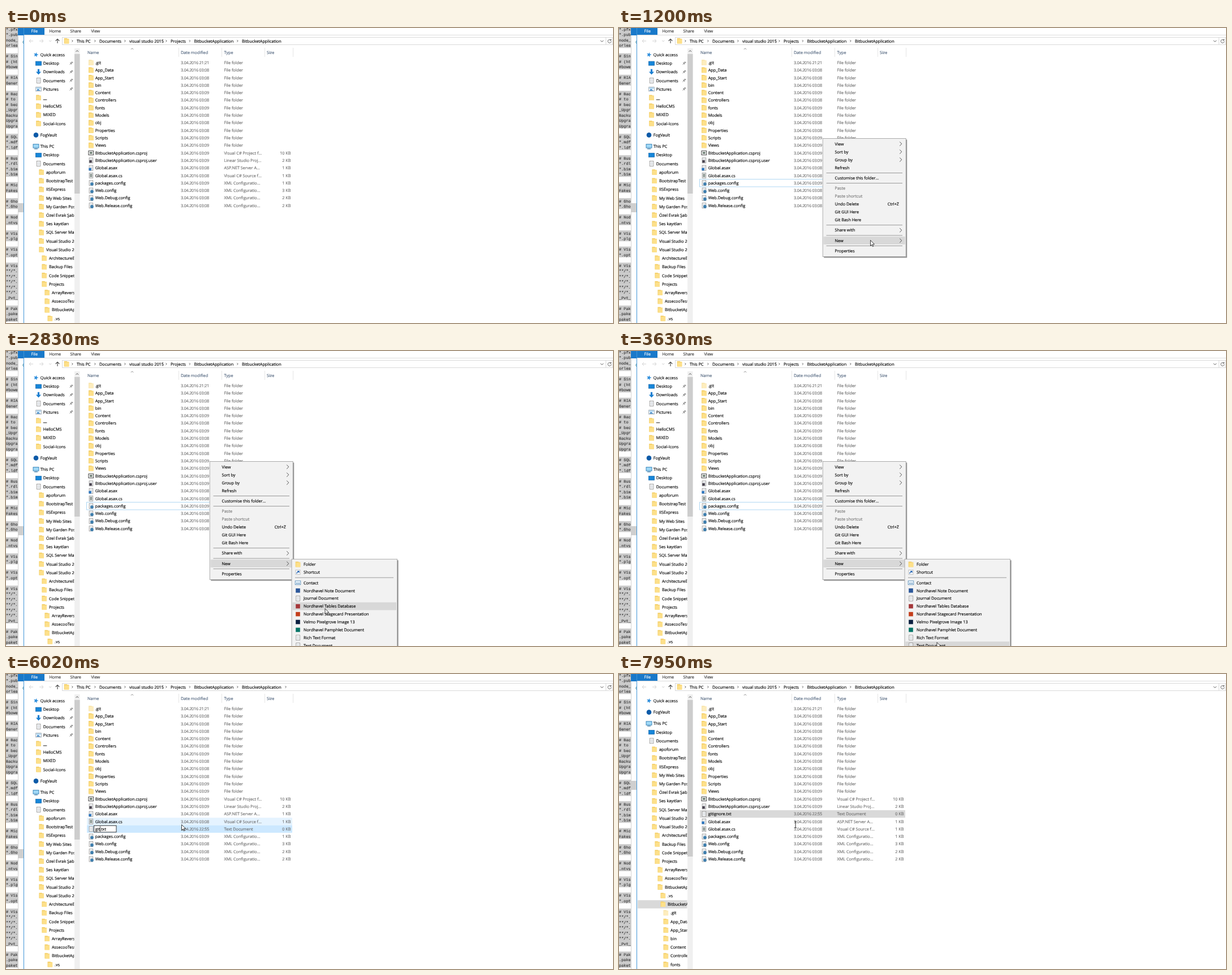
Write an HTML page that moves like this. It is 1073 px wide and 522 px high and loops after 8000 ms.

```html
<!DOCTYPE html>
<html lang="en">
<head>
<meta charset="utf-8">
<title>New text file</title>
<style>
html, body { margin: 0; width: 100%; height: 100%; overflow: hidden; background: #fff; }
svg { display: block; width: 100vw; height: 100vh; }
text { font: 7.27px "Open Sans", "Noto Sans", sans-serif; text-rendering: geometricPrecision; white-space: pre; stroke-width: .14px; }
.mono { font: 6.9px "Liberation Mono", "DejaVu Sans Mono", monospace; }
.digits { letter-spacing: -.23px; }
</style>
</head>
<body>
<svg id="stage" viewBox="0 0 1073 522" xmlns="http://www.w3.org/2000/svg">
<defs><clipPath id="nav"><rect x="33" y="36" width="87.5" height="486"/></clipPath>
<clipPath id="strip"><rect width="21" height="522"/></clipPath></defs>
</svg>
<script>
const stage = document.getElementById('stage');
const LOOP = 8000, INK = '#000', DIM = '#6d6d6d';

function add(parent, tag, attrs) {
  const node = document.createElementNS('http://www.w3.org/2000/svg', tag);
  for (const key in attrs) node.setAttribute(key, attrs[key]);
  return parent.appendChild(node);
}
const group = (parent, attrs = {}) => add(parent, 'g', attrs);
const rect = (parent, x, y, width, height, fill, more = {}) =>
  add(parent, 'rect', { x, y, width, height, fill, ...more });
const line = (parent, d, stroke, width = 1) =>
  add(parent, 'path', { d, stroke, fill: 'none', 'stroke-width': width });
const shape = (parent, d, fill) => add(parent, 'path', { d, fill });
// y is the middle of the capitals
function label(parent, x, y, str, fill = INK, more = {}) {
  const node = add(parent, 'text', { x, y: y + 2.6, fill, stroke: fill, ...more });
  node.textContent = str;
  return node;
}
const show = (node, on) => node.setAttribute('visibility', on ? 'visible' : 'hidden');
const move = (node, x, y) => node.setAttribute('transform', `translate(${x} ${y})`);

// Small icons, drawn around (x, y)
function page(g, x, y) {
  rect(g, x - 3.2, y - 4.5, 6.6, 9, '#fff', { stroke: '#8c8c8c', 'stroke-width': .8 });
  line(g, `M${x - 1.8} ${y - 2}h4M${x - 1.8} ${y}h4M${x - 1.8} ${y + 2}h4`, '#a9b4bd', .7);
}
const icons = {
  folder(g, x, y) {
    shape(g, `M${x - 4.3} ${y - 5}h5l1 1h2.6v8.6h-8.6z`, '#f4cf68');
    shape(g, `M${x - 3.4} ${y - 3.2}h7.7v7.8h-7.7z`, '#fde08a');
  },
  pale(g, x, y) { icons.folder(group(g, { opacity: .55 }), x, y); },
  page,
  star(g, x, y) {
    let d = '';
    for (let i = 0; i < 10; i++) {
      const r = i % 2 ? 1.9 : 4.5, a = i * Math.PI / 5 - 1.3;
      d += (i ? 'L' : 'M') + (x + r * Math.cos(a)).toFixed(2) + ' ' + (y + r * Math.sin(a)).toFixed(2);
    }
    shape(g, d + 'z', '#2f8fdc');
  },
  screen(g, x, y) { rect(g, x - 5, y - 3.5, 10, 7, '#1686d9', { stroke: '#1268ad', 'stroke-width': .8 }); },
  pc(g, x, y) {
    rect(g, x - 5, y - 4, 10, 6.5, '#9fd8f6', { stroke: '#2f7cb4', 'stroke-width': .9 });
    line(g, `M${x - 3} ${y + 4.2}h6`, '#3c7da8', 1.2);
  },
  down(g, x, y) { shape(g, `M${x - 1.6} ${y - 5}h3.2v4.6h3l-4.6 5-4.6-5h3z`, '#1b7fd1'); },
  picture(g, x, y) {
    rect(g, x - 4.8, y - 3.6, 9.6, 7.2, '#fff', { stroke: '#8c9aa5', 'stroke-width': .8 });
    shape(g, `M${x - 4} ${y + 2.6}l3-3 2 1.4 3 1.6z`, '#2f7fc4');
    rect(g, x - 4, y - 2.6, 8, 1.8, '#8fc6ec');
  },
  disc(g, x, y) { add(g, 'circle', { cx: x, cy: y, r: 4.3, fill: '#0a5aa8' }); },
  project(g, x, y) {
    rect(g, x - 4.4, y - 3.6, 8.8, 7.2, '#fff', { stroke: '#444', 'stroke-width': 1 });
    rect(g, x - 2.4, y - 1.5, 4.8, 3, '#5c6f63');
  },
  user(g, x, y) { page(g, x, y); rect(g, x - 3, y - .5, 4.5, 4.5, '#49434f'); },
  asax(g, x, y) { page(g, x, y); rect(g, x - 4, y, 4.5, 4.5, '#2f78c0'); },
  code(g, x, y) { page(g, x, y); line(g, `M${x - 2} ${y - 2}h4M${x - 2} ${y}h4M${x - 2} ${y + 2}h4`, '#3f5245', 1); },
  config(g, x, y) { page(g, x, y); add(g, 'circle', { cx: x + 1.6, cy: y + 1.8, r: 2.9, fill: '#3f7fae' }); },
  shortcut(g, x, y) {
    rect(g, x - 4, y - 4, 8, 8, '#fff', { stroke: '#aaa', 'stroke-width': .7 });
    line(g, `M${x - 2} ${y + 2.4}q0-3 3.6-3.6M${x - .8} ${y - 2}h2.8v2.8`, '#1c5fb0', 1.2);
  },
  contact(g, x, y) {
    rect(g, x - 4.8, y - 3.2, 9.6, 6.8, '#eef6fc', { stroke: '#4d86b5', 'stroke-width': .8 });
    line(g, `M${x - 3} ${y + 1}h2.6M${x + .6} ${y + 1}h2.6`, '#4d86b5', 1.4);
  },
  square(g, x, y, fill) { rect(g, x - 3.8, y - 3.8, 7.6, 7.6, fill); }
};

// Editor strip at the far left
const strip = group(stage, { 'clip-path': 'url(#strip)' });
const blocks = ['*.pfx|*.publ|node_|orlea', '# Sin|# (ht|#bowe', '# RIA|Gener',
  '# Bac|# to |# bec|_Upgr|Backu|Upgra|Upgra', '# SQL|*.mdf|*.ldf', '# Bus|*.rdl|*.bim|*.bim',
  '# Mic|Fakes', '# Gho|*.Gho', '# Nod|.ntvs', '# Vis|*.plg', '# Vis|*.opt',
  '# Vis|**/*.|**/*.|**/*.|**/*.|**/*.|_Pvt_', '# Pak|.pake|paket'];
let row = 0;
for (const block of blocks) {
  for (const str of block.split('|')) {
    const y = 2 + 9.5 * row++;
    rect(strip, 0, y - 4.8, 21, 9.6, '#c9c9c9');
    label(strip, 0, y, str, '#333', { class: 'mono' });
  }
  row++;
}

// Window behind
rect(stage, 21, 0, 11, 13, '#1979ca');
line(stage, 'M21.5 13V522', '#d4d4d4');
const backRow = rect(stage, 21, 310, 11, 16, '#cfcfcf');
line(stage, 'M31 22.5l-1.5 2.5 1.5 2.5', '#4b8fa0', 1);

// Window frame, ribbon and address bar
rect(stage, 32, 0, 1041, 522, '#fff');
line(stage, 'M31.5 0V522', '#3f94d6');
rect(stage, 32, 0, 36, 12, '#1979ca');
label(stage, 44.5, 5, 'File', '#fff');
label(stage, 76.5, 5, 'Home', '#333');
label(stage, 113.5, 5, 'Share', '#333');
label(stage, 150.5, 5, 'View', '#333');
line(stage, 'M32 12.5H1073', '#dcdcdc');
line(stage, 'M48 23h-7m3-3l-3 3 3 3M59 23h7m-3-3l3 3-3 3', '#cfcfcf', .9);
line(stage, 'M76.3 22l2 2 2-2', '#bbb', .8);
line(stage, 'M91 27v-7.5m-3.4 3.4l3.4-3.4 3.4 3.4', '#444', 1.1);
rect(stage, 99.5, 16.5, 973, 13, '#fff', { stroke: '#d9d9d9' });
line(stage, 'M1060.5 16V30', '#d9d9d9');
line(stage, 'M1051 22l2.5 2.5 2.5-2.5', '#555', 1);
line(stage, 'M1069 21.3a3 3 0 1 0 .9 2.2M1069.6 19.5v2.3h-2.4', '#555', .9);
icons.folder(stage, 107, 23);
const chevron = (g, x, y, s = 1.7) => line(g, `M${x - s / 2} ${y - s}l${s} ${s}-${s} ${s}`, '#444', .9);
for (const [x, str] of [[125, 'This PC'], [165, 'Documents'], [218, 'visual studio 2015'],
  [291, 'Projects'], [332.5, 'BitbucketApplication'], [417, 'BitbucketApplication']]) {
  chevron(stage, x - 7.7, 23);
  label(stage, x, 23, str);
}
const lastCrumb = chevron(stage, 494.5, 23);

// Navigation pane
const nav = group(stage, { 'clip-path': 'url(#nav)' });
function navItem(g, depth, y, icon, str) {
  const x = [53, 57.5, 62.7, 67.7, 72.7, 77.8, 82.8][depth];
  icons[icon](g, x, y);
  label(g, x + (depth ? 8.3 : 7.8), y, str);
}
navItem(nav, 0, 47.3, 'star', 'Quick access');
const quick = group(stage);
[['screen', 'Desktop'], ['down', 'Downloads'], ['page', 'Documents'], ['picture', 'Pictures'],
  ['folder', '__'], ['folder', 'HelloCMS'], ['folder', 'MIXED'], ['folder', 'Social-Icons']]
  .forEach(([icon, str], i) => {
    const y = 62.6 + 15.2 * i;
    navItem(quick, 1, y, icon, str);
    if (i < 4) {
      line(quick, `M112.5 ${y + 2.5}l2.3-2.3`, '#777', .8);
      line(quick, `M113.5 ${y - 1.2}l2.8 2.8M114.8 ${y - .3}l2-2M116 ${y - 3}l2.2 2.2`, '#777', 1.1);
    }
  });
const tree = group(nav);
rect(tree, 33, 522, 88, 14.5, '#d9d9d9');
navItem(tree, 0, 189.4, 'disc', 'FogVault');
const branches = ['0This PC', '1Desktop', '1Documents', '2apoforum', '2BootstrapTest', '2IISExpress',
  '2My Web Sites', '2My Garden Posts', '2Özel Evrak Şab', '2Ses kayıtları', '2SQL Server Man',
  '2Visual Studio 20', '2Visual Studio 20', '3ArchitectureEx', '3Backup Files', '3Code Snippets', '3Projects',
  '4ArrayReverse', '4AssecooTest', '4BitbucketApp', '5.vs', '5BitbucketApp', '6.git', '6App_Data',
  '6App_Start', '6bin', '6Content', '6Controllers', '6fonts'];
branches.forEach((item, i) => {
  const icon = ['pc', 'screen', 'page'][i] || (item === '6.git' ? 'pale' : 'folder');
  navItem(tree, +item[0], 209.6 + 15.22 * i, icon, item.slice(1));
});
rect(stage, 121, 36, 9.5, 486, '#f0f0f0');
line(stage, 'M123.5 42l2.3-2.3 2.3 2.3', '#555', 1);
const thumb = rect(stage, 121, 46, 9.5, 247, '#cdcdcd');

// File list
for (const [x, str] of [[144, 'Name'], [309, 'Date modified'], [385.5, 'Type'], [461, 'Size']])
  label(stage, x, 43, str, '#4c607a');
line(stage, 'M305.5 35V51M381.5 35V51M457.5 35V51M507.5 35V51', '#e5e5e5');
line(stage, 'M220.8 38l2.2-2.2 2.2 2.2', '#777', .8);

const rowY = i => 61.3 + 13.31 * i;
const hover = rect(stage, 143, rowY(15) - 6.65, 363, 13.3, '#e5f3ff');
const selection = rect(stage, 143, 0, 363, 13.3, '#cce8ff');
const focus = rect(stage, 142.5, rowY(16) - 6.6, 363, 13.3, 'none', { stroke: '#a5d3f2', 'stroke-width': .9 });

function fileRow(icon, name, time, type, size) {
  const g = group(stage);
  icons[icon](g, 150.3, 0);
  g.name = label(g, 157.7, 0, name);
  label(g, 309, 0, '3.04.2016 ' + time, DIM, { class: 'digits' });
  label(g, 385.5, 0, type, DIM);
  if (size) label(g, 503.5, 0, size + ' KB', DIM, { 'text-anchor': 'end' });
  return g;
}
['.git', 'App_Data', 'App_Start', 'bin', 'Content', 'Controllers', 'fonts', 'Models', 'obj',
  'Properties', 'Scripts', 'Views'].forEach((name, i) => {
  const time = i ? '03:0' + '888898988899'[i] : '21:21';
  move(fileRow(i ? 'folder' : 'pale', name, time, 'File folder'), 0, rowY(i));
});
const files = [
  ['project', 'BitbucketApplication.csproj', '03:09', 'Visual C# Project f...', '10'],
  ['user', 'BitbucketApplication.csproj.user', '03:09', 'Linear Studio Proj...', '2'],
  ['asax', 'Global.asax', '03:08', 'ASP.NET Server A...', '1'],
  ['code', 'Global.asax.cs', '03:08', 'Visual C# Source f...', '1'],
  ['config', 'packages.config', '03:09', 'XML Configuratio...', '1'],
  ['config', 'Web.config', '03:08', 'XML Configuratio...', '3'],
  ['config', 'Web.Debug.config', '03:08', 'XML Configuratio...', '2'],
  ['config', 'Web.Release.config', '03:08', 'XML Configuratio...', '2']
].map(item => fileRow(...item));
const fresh = fileRow('page', 'gitignore.txt', '22:55', 'Text Document', '0');

// Rename field
const field = group(stage);
move(field, 0, rowY(16));
const box = rect(field, 155.5, -6, 99, 11.6, '#fff', { stroke: '#222', 'stroke-width': .9 });
const marked = rect(field, 157.7, -5, 68, 9.8, '#2f86d6');
const stem = label(field, 157.7, 0, '');
const ext = label(field, 157.7, 0, '.txt');
const caret = rect(field, 0, -5, .8, 9.8, '#111');

// Menus
function panel(x, y, w, h) {
  const g = group(stage);
  rect(g, x + 2, y + 2, w, h, '#8f8f8f');
  rect(g, x, y, w, h, '#f2f2f2', { stroke: '#a3a3a3', 'stroke-width': .9 });
  g.bar = rect(g, x + 1.5, 0, w - 3, 13.8, '#d8d8d8');
  return g;
}
const menu = panel(360.2, 195.5, 147, 209);
menu.bar.setAttribute('y', 369.2);
for (const [y, str, arrow] of [[205, 'View', 1], [219, 'Sort by', 1], [233, 'Group by', 1], [247, 'Refresh'],
  [265.3, 'Customise this folder...'], [283.8, 'Paste'], [297.7, 'Paste shortcut'], [311.6, 'Undo Delete'],
  [325.5, 'Git GUI Here'], [339.5, 'Git Bash Here'], [357.8, 'Share with', 1], [376.2, 'New', 1],
  [394.6, 'Properties']]) {
  label(menu, 381.6, y, str, str.startsWith('Paste') ? '#777' : INK);
  if (arrow) chevron(menu, 498, y, 3.6);
}
label(menu, 495, 311.6, 'Ctrl+Z', INK, { 'text-anchor': 'end' });
for (const y of [256.5, 274.6, 348.7, 367, 385.5]) line(menu, `M366.5 ${y}H501`, '#8f8f8f', .9);

const submenu = panel(505, 368.3, 186.5, 170);
const kinds = [[377.7, 'Folder', 'folder'], [391.6, 'Shortcut', 'shortcut'], [410, 'Contact', 'contact'],
  [423.9, 'Nordhavel Note Document', '#2b579a'], [437.8, 'Journal Document', 'page'],
  [451.7, 'Nordhavel Tables Database', '#a4373a'], [465.6, 'Nordhavel Stagecard Presentation', '#c43e1c'],
  [479.5, 'Velmo Pixelgrove Image 13', '#0b1e3f'], [493.4, 'Nordhavel Pamphlet Document', '#077568'],
  [507.3, 'Rich Text Format', 'page'], [521.2, 'Text Document', 'page']];
for (const [y, str, icon] of kinds) {
  if (icon[0] === '#') icons.square(submenu, 516, y, icon);
  else icons[icon](submenu, 516, y);
  label(submenu, 526, y, str);
}
line(submenu, 'M511 401H685', '#8f8f8f', .9);

// Pointers
const arrow = add(stage, 'path', {
  d: 'M0 0V10L2.3 7.8L3.8 11.3L5.3 10.6L3.8 7.3H7Z', fill: '#fff', stroke: '#111', 'stroke-width': .8
});
const beam = line(stage, 'M-2 -5.5h1.5l.5.5.5-.5H2M0-5V5M-2 5.5h1.5l.5-.5.5.5H2', '#111', .9);
move(beam, 312, 266.5);

// Bursts of change: start, end, number of steps
const bursts = [[30, 810, 16], [870, 1000, 4], [1140, 1200, 2], [1410, 2200, 17], [2250, 3040, 15],
  [3110, 3210, 3], [3630, 4430, 16], [4470, 4580, 3], [4740, 5120, 9], [5600, 5600, 1], [5740, 5740, 1],
  [5960, 6020, 2], [6400, 6530, 2], [6750, 6750, 1], [6890, 7090, 3], [7350, 7490, 3], [7740, 7950, 4]];
const route = [[30, 911, 511], [450, 361, 196], [560, 361, 196], [810, 441, 380], [870, 442, 380],
  [1000, 444, 375.5], [1200, 444.5, 375.5], [1460, 444.5, 375.5], [1800, 525, 377], [2200, 562, 422],
  [2800, 564, 455.5], [2840, 564, 456], [3040, 563, 494], [3210, 562, 504], [3600, 562, 507],
  [3630, 562, 515.5], [3780, 562, 515.5], [4430, 226, 302], [4470, 215, 265.5], [4700, 215, 265.5],
  [5120, 310.5, 266.5]];
const typed = [[0, 'New Text Document'], [5740, 'g'], [5960, 'gi'], [6020, 'git'], [6400, 'giti'],
  [6530, 'gitig'], [6750, 'gitign'], [6890, 'gitigno'], [6990, 'gitignor'], [7090, 'gitignore']];

function snap(t) {
  let out = 0;
  for (const [a, b, n] of bursts) {
    if (t < a) break;
    const step = n > 1 ? (b - a) / (n - 1) : 1;
    out = Math.min(b, a + Math.floor((t - a) / step + 1e-6) * step);
  }
  return out;
}
function pointer(t) {
  for (let i = 1; i < route.length; i++) {
    const [a, x0, y0] = route[i - 1], [b, x1, y1] = route[i];
    if (t <= b) {
      const k = Math.max(0, (t - a) / (b - a));
      return [x0 + (x1 - x0) * k, y0 + (y1 - y0) * k];
    }
  }
  return route[route.length - 1].slice(1);
}

function render(time) {
  const t = snap(time), between = (a, b) => t >= a && t < b;
  const [px, py] = pointer(t);
  const made = t >= 3880, sorted = t >= 7415, naming = between(3930, 7345), moved = t >= 7740;

  move(arrow, px, py);
  show(arrow, between(30, 7870));
  show(beam, t >= 7870);

  show(menu, between(500, 3780));
  show(menu.bar, between(870, 3780));
  show(submenu, between(1410, 3780));
  const over = px > 506 && kinds.find(k => Math.abs(py - k[0]) <= 7);
  show(submenu.bar, over && between(1410, 3780));
  if (over) submenu.bar.setAttribute('y', over[0] - 7);

  files.forEach((g, i) => {
    const shift = made && (sorted ? i > 1 : i > 3) ? 1 : 0;
    move(g, 0, rowY(12 + i + shift));
  });
  const freshY = rowY(sorted ? 14 : 16);
  move(fresh, 0, freshY);
  show(fresh, made);
  show(fresh.name, made && !naming);
  selection.setAttribute('y', freshY - 6.65);
  selection.setAttribute('fill', t >= 7870 ? '#d9d9d9' : '#cce8ff');
  show(selection, made);
  show(hover, between(4580, 7870));
  show(focus, between(500, 3880));
  show(lastCrumb, made && !moved);

  const word = typed.filter(k => t >= k[0] - .5).pop()[1];
  const untouched = word === typed[0][1];
  stem.textContent = word;
  for (const key of ['fill', 'stroke']) stem.setAttribute(key, untouched ? '#fff' : INK);
  const w = stem.getComputedTextLength();
  ext.setAttribute('x', 157.7 + w);
  marked.setAttribute('width', w);
  caret.setAttribute('x', 157.5 + w);
  box.setAttribute('width', w + ext.getComputedTextLength() + 20.2);
  for (const node of [box, stem, ext]) show(node, naming);
  show(marked, naming && untouched);
  show(caret, naming && t >= 5600);

  show(quick, !moved);
  move(tree, 0, moved ? -121.75 : 0);
  thumb.setAttribute('height', moved ? 277 : 247);
  backRow.setAttribute('y', moved ? 189 : 310);
}

const start = performance.now();
function tick() {
  render((performance.now() - start) % LOOP);
  requestAnimationFrame(tick);
}
tick();
</script>
</body>
</html>
```
